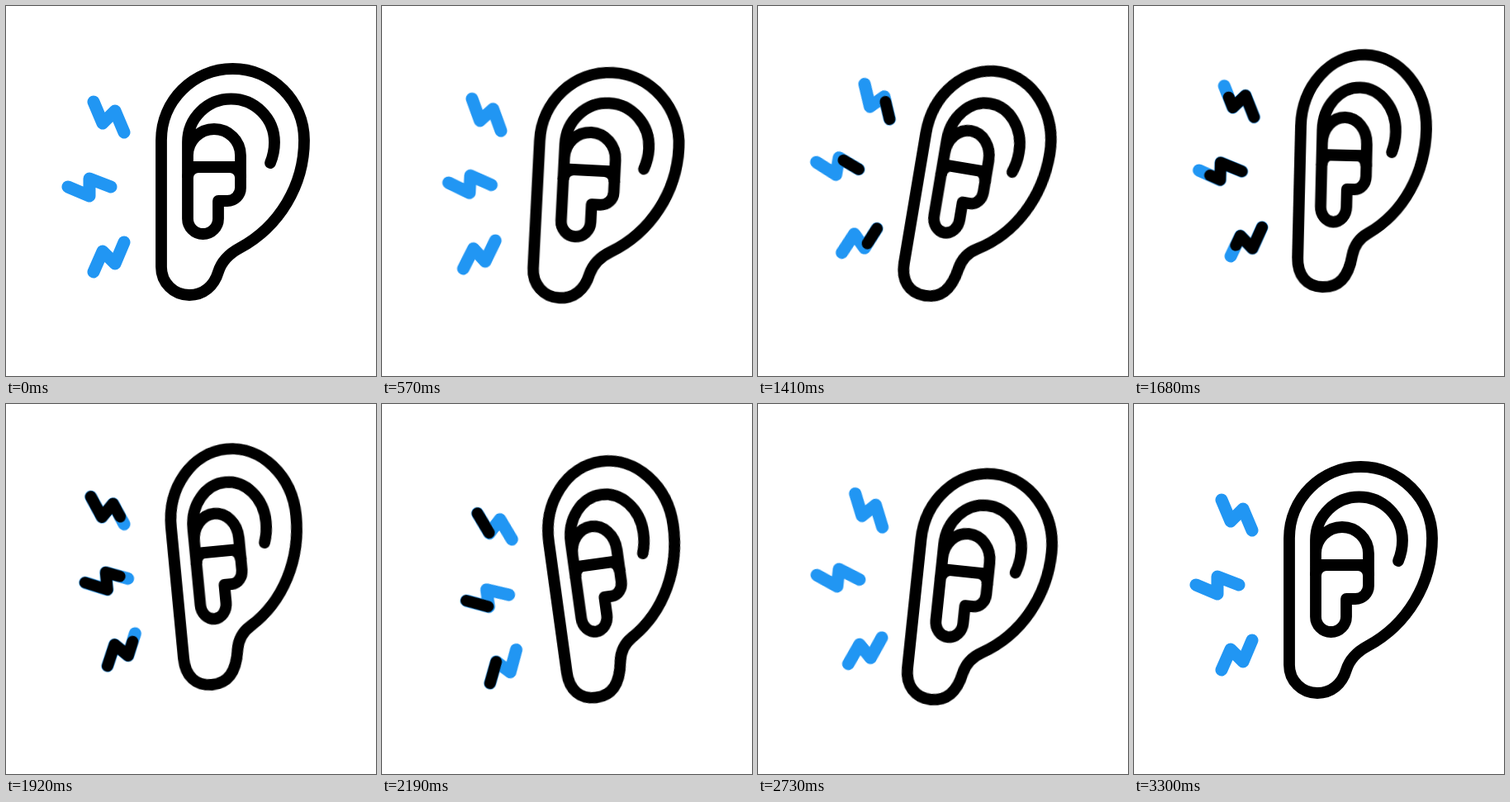
An HTML page for the animation above (3.6 s loop, 448x448 px).

```html
<!DOCTYPE html>
<html lang="en">
<head>
<meta charset="utf-8">
<title>Ear with sound sparks</title>
<style>
  @property --from { syntax: "<length>"; inherits: false; initial-value: 100px; }
  @property --to { syntax: "<length>"; inherits: false; initial-value: 100px; }

  html, body { margin: 0; width: 100%; height: 100%; overflow: hidden; background: #fff; }
  svg { display: block; width: 448px; height: 448px; }

  path { fill: none; stroke: #000; stroke-width: 13.8px; stroke-linecap: round; stroke-linejoin: round; }
  .inner path { vector-effect: non-scaling-stroke; }
  .inner .bar { stroke-linecap: butt; }
  .bolt { stroke: #2196f3; stroke-width: 15px; }

  .tilt, .sway, .bob, .outer, .inner, .rise, .pulse {
    animation: 3.6s cubic-bezier(.37, 0, .63, 1) infinite;
  }
  .tilt { animation-name: tilt; transform-origin: 224px 224px; }
  .sway { animation-name: sway; }
  .bob { animation-name: bob; }
  .outer { animation-name: squeeze-outer; }
  .inner { animation-name: squeeze-inner; transform-origin: 0 0; }
  .rise { animation-name: rise; }
  .pulse { animation-name: pulse; animation-delay: var(--lag); }

  /* black trace runs along each bolt from its ear end */
  .trace {
    stroke-dasharray: calc(var(--to) - var(--from)) 300px;
    stroke-dashoffset: calc(var(--from) * -1);
    visibility: hidden;
    animation: 3.6s cubic-bezier(.37, 0, .63, 1) infinite;
    animation-name: trace-from, trace-to, trace-show;
    animation-timing-function: cubic-bezier(.37, 0, .63, 1), cubic-bezier(.37, 0, .63, 1), step-end;
  }

  @keyframes tilt {
    0%, 8.33% { transform: rotate(0deg); }
    31.94% { transform: rotate(12.8deg); }
    59.72% { transform: rotate(-8deg); }
    77.78% { transform: rotate(6.4deg); }
    91.67%, 100% { transform: rotate(0deg); }
  }
  @keyframes sway {
    0%, 8.33% { transform: translateX(0px); }
    31.94% { transform: translateX(-11.2px); }
    60.2% { transform: translateX(10px); }
    77.78% { transform: translateX(-5.2px); }
    91.67%, 100% { transform: translateX(0px); }
  }
  @keyframes bob {
    0%, 8.33% { transform: translateY(0px); }
    30% { transform: translateY(13.8px); }
    49.7% { transform: translateY(-11.3px); }
    66.1% { transform: translateY(15px); }
    87.8%, 100% { transform: translateY(0px); }
  }
  @keyframes squeeze-outer {
    0%, 8.33%, 91.67%, 100% {
      d: path("M188 162.5C188 114.7 226.7 76 274.5 76C322.3 76 361 114.7 361 162.5C361 217 331 267 283 293C270 300 261 309 257 322C252 339 239 350 222 350C203 350 188 335 188 316Z");
    }
    33.33%, 65.83% {
      d: path("M200 156C200 107 234 67.7 276 67.7C318 67.7 352 107 352 156C352 209 327 258 284 284C274 290 268 299 266 311C262 337 251 350 231 350C212 350 200 337 200 315Z");
    }
  }
  @keyframes squeeze-inner {
    0%, 8.33%, 91.67%, 100% { transform: translate(0px, 0px) scale(1, 1); }
    33.33%, 65.83% { transform: translate(40.4px, -5px) scale(.845, 1); }
  }
  @keyframes rise {
    0%, 8.33%, 91.67%, 100% { transform: translateY(0px); }
    33.33%, 65.83% { transform: translateY(-6.6px); }
  }
  @keyframes pulse {
    0%, 9.2%, 38.8%, 42.8%, 72.4%, 100% { transform: translateX(0px); }
    24%, 57.6% { transform: translateX(18.5px); }
  }
  @keyframes trace-from {
    0%, 31.67% { --from: 100px; }
    52.78%, 100% { --from: 0px; }
  }
  @keyframes trace-to {
    0%, 48.33% { --to: 100px; }
    69.44%, 100% { --to: 0px; }
  }
  @keyframes trace-show {
    0% { visibility: hidden; }
    31.8% { visibility: visible; }
    69.4%, 100% { visibility: hidden; }
  }
</style>
</head>
<body>
<svg viewBox="0 0 448 448">
  <g class="tilt"><g class="sway"><g class="bob">
    <path class="outer" d="M188 162.5C188 114.7 226.7 76 274.5 76C322.3 76 361 114.7 361 162.5C361 217 331 267 283 293C270 300 261 309 257 322C252 339 239 350 222 350C203 350 188 335 188 316Z"/>
    <g class="inner">
      <path d="M320 190Q325 178 325 165A52.5 52.5 0 0 0 220 165V257.5A18.5 18.5 0 0 0 257 257.5V236H268A16 16 0 0 0 284 220V181A32 32 0 0 0 220 181"/>
      <path class="bar" d="M220 208A13 13 0 0 1 233 195H271A13 13 0 0 1 284 208"/>
      <path class="bar" d="M220 195H284"/>
    </g>
    <g class="rise">
      <g class="pulse" style="--lag: .31s">
        <path class="bolt" d="M106 116L117 142L132 127L143 153"/>
        <path class="trace" pathLength="100" d="M106 116L117 142L132 127L143 153"/>
      </g>
      <g class="pulse" style="--lag: 0s">
        <path class="bolt" d="M75 219L101 230V209L127 219"/>
        <path class="trace" pathLength="100" d="M75 219L101 230V209L127 219"/>
      </g>
      <g class="pulse" style="--lag: .62s">
        <path class="bolt" d="M106 322L117 297L132 312L143 286"/>
        <path class="trace" pathLength="100" d="M106 322L117 297L132 312L143 286"/>
      </g>
    </g>
  </g></g></g>
</svg>
</body>
</html>
```
